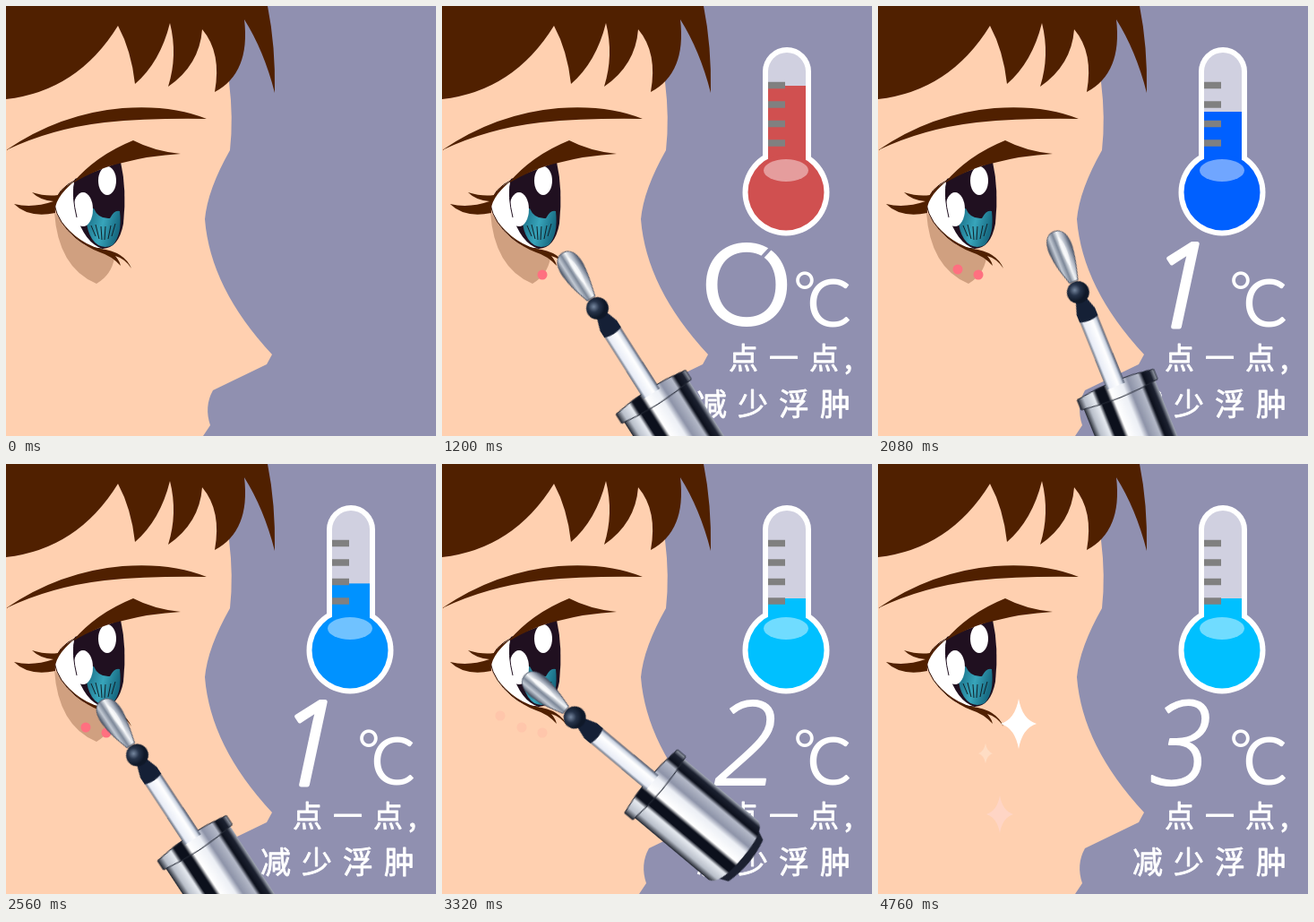
Recreate the animation shown at these times as an HTML page without scripts. Size 480 px wide and 480 px high, loop 4800 ms.

```html
<!DOCTYPE html>
<html lang="zh">
<head>
<meta charset="utf-8">
<title>点一点</title>
<style>
  html, body { margin: 0; width: 100%; height: 100%; overflow: hidden; background: #9090b0 }
  svg { display: block; width: 100%; height: 100% }
  .move { animation: 4.8s linear infinite }
  .switch { opacity: 0; animation: 4.8s step-end infinite }
  .hair { fill: #502000 }
  .dot { fill: #ff7080 }
  .label { fill: #fff; text-anchor: middle }
  .round { font-family: Lato, sans-serif }
  .slant { font: italic 300 130px "Open Sans", sans-serif; stroke: #fff; stroke-width: 2; stroke-linejoin: round }
  .caption {
    fill: #fff; stroke: #fff; stroke-width: .8; stroke-linejoin: round;
    font: 500 33px "Noto Sans CJK SC", "Noto Sans CJK", sans-serif; letter-spacing: 12px;
  }

  .caption { animation-name: caption }
  @keyframes caption { 0%, 6% { opacity: 0 } 10.5%, 100% { opacity: 1 } }

  /* thermometer */
  .thermo { animation-name: pop; transform-origin: 384px 151px }
  @keyframes pop {
    0%, 11.25% { transform: scale(0) }
    13.33% { transform: scale(.57) }
    15.83% { transform: scale(1.25) }
    18.33%, 100% { transform: scale(1) }
  }
  .frame { animation-name: frame }
  @keyframes frame { 0%, 14.2% { opacity: 0 } 17.5%, 100% { opacity: 1 } }
  .liquid { animation-name: cool }
  @keyframes cool {
    0%, 25% { fill: #d05050 }
    43.33% { fill: #0060ff }
    62.5%, 100% { fill: #00c0ff }
  }
  .level { animation-name: sink }
  @keyframes sink {
    0%, 25% { transform: translateY(0) }
    35% { transform: translateY(13px) }
    43.33% { transform: translateY(29px) }
    58.33% { transform: translateY(52px) }
    63.5%, 100% { transform: translateY(61px) }
  }

  /* readings */
  .unit { animation-name: unit }
  .zero { animation-name: zero }
  .one { animation-name: one; stroke-width: 5 }
  .two { animation-name: two }
  .three { animation-name: three }
  @keyframes unit { 0% { opacity: 0 } 17.5%, 100% { opacity: 1 } }
  @keyframes zero { 0% { opacity: 0 } 17.5% { opacity: 1 } 35%, 100% { opacity: 0 } }
  @keyframes one { 0% { opacity: 0 } 35% { opacity: 1 } 57.5%, 100% { opacity: 0 } }
  @keyframes two { 0% { opacity: 0 } 57.5% { opacity: 1 } 71%, 100% { opacity: 0 } }
  @keyframes three { 0% { opacity: 0 } 71%, 100% { opacity: 1 } }

  /* skin */
  .shadow { animation-name: heal }
  @keyframes heal { 0%, 58.5% { opacity: 1 } 62.5% { opacity: .5 } 69%, 100% { opacity: 0 } }
  .dots { animation-name: absorb }
  @keyframes absorb { 0%, 62.5% { opacity: 1 } 70%, 100% { opacity: 0 } }
  .first { animation-name: first }
  .second { animation-name: second }
  .third { animation-name: third }
  @keyframes first { 0% { opacity: 0 } 15%, 100% { opacity: 1 } }
  @keyframes second { 0% { opacity: 0 } 35.83%, 100% { opacity: 1 } }
  @keyframes third { 0% { opacity: 0 } 57.5%, 100% { opacity: 1 } }

  .wand { animation-name: dab }
  @keyframes dab {
    0% { transform: translate(180px, 490px) rotate(-30deg) }
    11.67%, 23% { transform: translate(110px, 288px) rotate(-33.5deg) }
    25% { transform: translate(134px, 276px) rotate(-32.5deg) }
    29.17% { transform: translate(196px, 252px) rotate(-22deg) }
    35.42%, 37.5% { transform: translate(92px, 284px) rotate(-34deg) }
    43.33%, 47.5% { transform: translate(196px, 252px) rotate(-22deg) }
    56.25%, 58.33% { transform: translate(62px, 270px) rotate(-39deg) }
    60.5% { transform: translate(42px, 255px) rotate(-45deg) }
    62.5% { transform: translate(64px, 245px) rotate(-48deg) }
    66.25% { transform: translate(200px, 215px) rotate(-55deg) }
    70.42% { transform: translate(47px, 245px) rotate(-48deg) }
    74.17% { transform: translate(200px, 165px) rotate(-55deg) }
    78%, 100% { transform: translate(510px, 490px) rotate(-45deg) }
  }

  /* sparkles */
  .sparkles { animation-name: sparkles }
  @keyframes sparkles { 0% { opacity: 0 } 73%, 100% { opacity: 1 } }
  .bright { animation-name: bright }
  @keyframes bright {
    0%, 72% { transform: scale(0); animation-timing-function: ease-in-out }
    80% { transform: scale(1); opacity: 1; animation-timing-function: ease-in-out }
    89.58% { transform: scale(.1); opacity: .2; animation-timing-function: ease-in-out }
    99.17%, 100% { transform: scale(1); opacity: 1 }
  }
  .tiny { animation-name: tiny }
  @keyframes tiny {
    0%, 72% { transform: scale(.1); opacity: 0 }
    80% { transform: scale(.4); opacity: .6 }
    89.58% { transform: scale(.6); opacity: 1 }
    99.17%, 100% { transform: scale(.4); opacity: .6 }
  }
  .large { animation-name: large }
  @keyframes large {
    0%, 72% { transform: scale(1.4); opacity: .9 }
    75% { transform: scale(1.57); opacity: 1 }
    80% { transform: scale(1.07); opacity: .9 }
    84.5% { transform: scale(.1); opacity: .1 }
    93.75% { transform: scale(1.57); opacity: 1 }
    99.17%, 100% { transform: scale(.75); opacity: .45 }
  }
</style>
</head>
<body>
<svg viewBox="0 0 480 480">
  <defs>
    <linearGradient id="iris" x2="1" y2=".3">
      <stop stop-color="#176a82"/><stop offset=".55" stop-color="#38a5bb"/><stop offset="1" stop-color="#176a82"/>
    </linearGradient>
    <linearGradient id="chrome">
      <stop stop-color="#20242e"/><stop offset=".08" stop-color="#b9bfca"/>
      <stop offset=".2" stop-color="#e6eaf0"/><stop offset=".25" stop-color="#0c101c"/>
      <stop offset=".36" stop-color="#0c101c"/><stop offset=".41" stop-color="#fff"/>
      <stop offset=".58" stop-color="#eceff5"/><stop offset=".66" stop-color="#8d93a8"/>
      <stop offset=".8" stop-color="#b4b9c8"/><stop offset=".85" stop-color="#0c101c"/>
      <stop offset=".94" stop-color="#1c2130"/><stop offset="1" stop-color="#aab0bc"/>
    </linearGradient>
    <linearGradient id="stem">
      <stop stop-color="#5c687c"/><stop offset=".15" stop-color="#e8ecf6"/>
      <stop offset=".65" stop-color="#fff"/><stop offset=".85" stop-color="#ccd4e2"/>
      <stop offset="1" stop-color="#465066"/>
    </linearGradient>
    <linearGradient id="steel">
      <stop stop-color="#4c5668"/><stop offset=".22" stop-color="#c3cad4"/>
      <stop offset=".4" stop-color="#7c8798"/><stop offset=".6" stop-color="#f4f6f8"/>
      <stop offset=".8" stop-color="#a8b0be"/><stop offset="1" stop-color="#465064"/>
    </linearGradient>
    <radialGradient id="bead" cx=".4" cy=".35">
      <stop stop-color="#7788a0"/><stop offset=".5" stop-color="#263349"/><stop offset="1" stop-color="#0f1828"/>
    </radialGradient>
    <path id="star" d="M0-28Q4-5 20 0Q4 5 0 28Q-4 5-20 0Q-4-5 0-28Z"/>
  </defs>

  <rect width="480" height="480" fill="#9090b0"/>
  <path fill="#ffd0b0" d="M0 0H245L249 85Q254 125 250 161Q225 205 222 238Q228 315 297 389L291 400L231 429Q221 447 228 468L220 480H0Z"/>
  <path class="hair" d="M0 104Q80 95 125 22Q140 50 144 87Q172 63 183 19Q192 55 181 90Q216 66 219 26Q241 52 233 96Q273 75 266 15Q288 50 300 97Q301 45 292 0H0Z"/>
  <path class="hair" d="M0 161Q60 120 130 114Q185 110 224 126Q160 125 110 130Q50 137 0 161Z"/>
  <path class="move shadow" fill="#d0a080" d="M54 230Q58 292 101 310Q118 300 121 281L105 273Q75 262 54 230Z"/>

  <g id="eye">
    <path fill="#fff" stroke="#301008" d="M78 194Q57 204 54 222Q58 242 78 259Q92 271 108 271L120 200Z"/>
    <path fill="#201020" d="M77 193L128 174Q135 205 131 243Q126 270 108 271Q88 265 78 232Q73 210 77 193Z"/>
    <path fill="url(#iris)" d="M90 240Q93 225 98 226Q103 238 116 237Q121 227 127 229Q130 255 119 267Q105 273 96 260Q90 250 90 240Z"/>
    <path stroke="#102028" d="M95 245l5 12M100 244l4 16M106 246l1 15M111 246l-1 15M117 245l-3 15M122 243l-4 14"/>
    <ellipse cx="113" cy="195" rx="10" ry="16" fill="#fff"/>
    <ellipse cx="86" cy="227" rx="11" ry="19" fill="#fff"/>
    <path fill="none" stroke="#201020" d="M77 194Q73 212 79 236"/>
    <path class="hair" d="M74 198Q100 167 142 150Q165 162 195 165Q160 167 130 175Q105 180 74 198Z"/>
    <path class="hair" d="M76 196Q62 203 58 211Q45 213 29 208Q38 217 53 218Q30 226 9 221Q25 237 55 231Q53 215 76 196Z"/>
    <path class="hair" d="M54 229Q75 263 105 271Q132 274 140 293Q133 282 122 279Q127 285 128 290Q118 279 105 275Q75 264 54 229Z"/>
  </g>

  <g class="move dots">
    <circle class="switch dot first" cx="112" cy="300" r="5.5"/>
    <circle class="switch dot second" cx="89" cy="294" r="5.5"/>
    <circle class="switch dot third" cx="65" cy="281" r="5.5"/>
  </g>

  <g class="move thermo">
    <g class="move frame" fill="#fff">
      <rect x="358" y="46" width="54" height="150" rx="27"/>
      <circle cx="384" cy="208" r="48.5"/>
    </g>
    <rect x="364" y="52" width="42" height="150" rx="21" fill="#d0d0e0"/>
    <g class="move liquid">
      <rect class="move level" x="364" y="89" width="42" height="92"/>
      <circle cx="384" cy="208" r="42.5"/>
    </g>
    <ellipse cx="384" cy="183.5" rx="25" ry="12.5" fill="#fff" opacity=".44"/>
    <path class="move frame" stroke="#808080" stroke-width="7.5" d="M364 88.500h19M364 110h19M364 131.500h19M364 153h19"/>
  </g>

  <g class="label">
    <g class="switch zero">
      <text class="round" x="340" y="357" font-size="128">O</text>
      <path stroke="#9090b0" stroke-width="4" d="M355 283L369 268"/>
    </g>
    <text class="switch slant one" x="338" y="358">1</text>
    <text class="switch slant two" x="338" y="358">2</text>
    <text class="switch slant three" x="338" y="358">3</text>
    <g class="switch round unit">
      <text x="405" y="340" font-size="60">°</text>
      <text x="432" y="358" font-size="74">C</text>
    </g>
  </g>
  <g class="move caption">
    <text x="320" y="405">点一点<tspan dx="-6">,</tspan></text>
    <text x="284" y="457" font-size="34">减少浮肿</text>
  </g>

  <g class="move wand">
    <rect x="-10.5" y="102" width="21" height="90" fill="url(#stem)"/>
    <path fill="#1c2130" d="M-40 300H40L30 322Q0 330-30 322Z"/>
    <path fill="url(#chrome)" d="M-43 193H43V304Q40 317 0 317Q-40 317-43 304Z"/>
    <path fill="url(#chrome)" stroke="#252a36" d="M-46 184Q0 176 46 184V196Q0 203-46 196Z"/>
    <rect x="-10.5" y="150" width="21" height="36" fill="url(#stem)"/>
    <path fill="#152036" d="M-5 78H5L11 96V105Q0 109-11 105V96Z"/>
    <circle cy="73" r="12.5" fill="url(#bead)"/>
    <path fill="url(#steel)" stroke="#4c5668" d="M0 0C12 0 14 13 13 24C11 40 7 52 5 60H-5C-7 52-12 40-13 24C-14 12-11 0 0 0Z"/>
    <path fill="#fff" opacity=".65" d="M2 6Q10 18 3 46Q-2 25 2 6Z"/>
  </g>

  <g class="switch sparkles">
    <g transform="translate(157 290)"><use class="move bright" href="#star" fill="#fff"/></g>
    <g transform="translate(120 323)"><use class="move tiny" href="#star" fill="#ffe6d2"/></g>
    <g transform="translate(136 391)"><use class="move large" href="#star" fill="#ffdce0"/></g>
  </g>
</svg>
</body>
</html>
```
